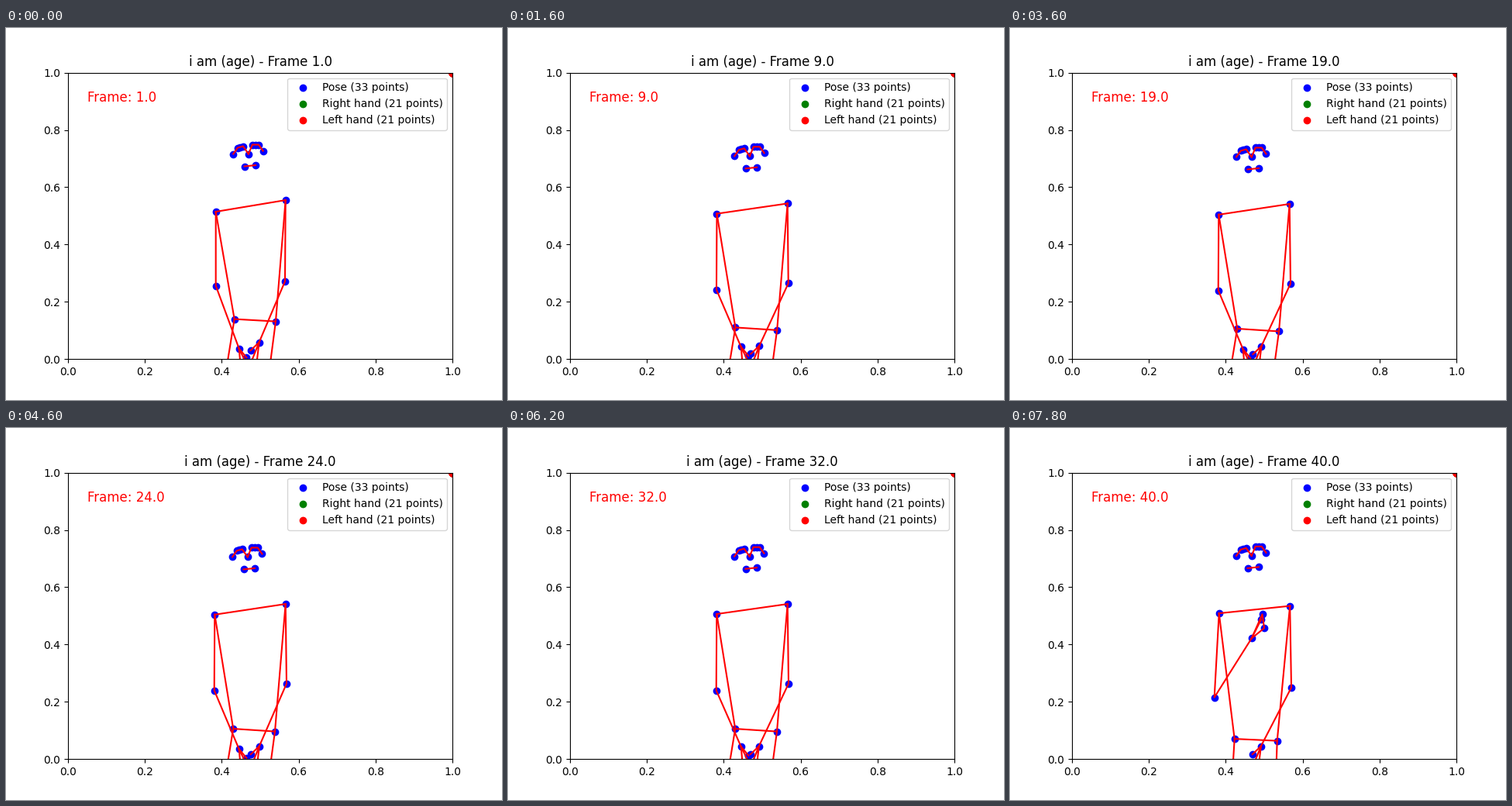
A matplotlib script for the animation above (8000 ms loop, 640 by 480 pixels).

```python
import numpy as np
import matplotlib.pyplot as plt
from matplotlib.animation import FuncAnimation

FRAMES = 40

# Resting pose in pixels, counted from the top left of the stage.
HEAD = {"nose": (312, 166), "ear_l": (330.7, 162), "ear_r": (292.4, 166),
        "mouth_l": (321.2, 180.5), "mouth_r": (306.8, 182)}
for k in range(3):
    HEAD[f"eye_l{k}"] = (317 + 4 * k, 154)
    HEAD[f"eye_r{k}"] = (305 - 3.5 * k, 156 + k)

# Resting place, offset at the start, offset once the hand is up.
BODY = {
    "shoulder_l": [(361, 227.5), (0, -5), (0.5, 2.5)],
    "shoulder_r": [(269.6, 240.3), (1.4, -2), (0.4, 0)],
    "elbow_l": [(362.3, 330.3), (-2, -3), (1, 5)],
    "hip_l": [(347.3, 392), (1, -13), (-2.3, 12)],
    "hip_r": [(293.5, 388.5), (1.5, -12.5), (-3.5, 13)],
    "knee_l": [(326, 550), (0, 0), (14, 0)],
    "knee_r": [(267, 550), (0, 0), (14, 0)],
    "wrist_l": [(325, 411), (0, -5), (0, 0)],
}

# Finger offsets from the left wrist.
FINGERS_L = {"pinky_l": (-3, 26), "index_l": (-10, 25), "thumb_l": (-11, 10.5)}
# Right fingers as (angle, length) from the wrist, lowered and raised.
FINGERS_R = {"pinky_r": [(85, 23), (-39, 21)], "index_r": [(64, 25), (-66, 34)],
             "thumb_r": [(50, 15), (-63, 27)]}

CHAINS = [
    "nose eye_l0 eye_l1 eye_l2 ear_l", "nose eye_r0 eye_r1 eye_r2 ear_r",
    "mouth_l mouth_r", "shoulder_l shoulder_r", "hip_l hip_r",
]
for s in "lr":
    CHAINS += [f"shoulder_{s} elbow_{s} wrist_{s} pinky_{s} index_{s} wrist_{s}",
               f"wrist_{s} thumb_{s}", f"shoulder_{s} hip_{s} knee_{s}"]


def pose(n):
    """Joint positions in axes units for counter value n."""
    settle = np.exp((1 - n) / 4)
    bob = np.sin(np.pi * (n - 9) / 24)
    sway = np.sin(2 * np.pi * (n - 19.5) / 22)
    rise = np.clip((n - 32) / 8, 0, 1)
    lean = 1 - (1 - rise) ** 2
    lift = rise ** 1.3

    pts = {}
    for name, place in HEAD.items():
        pts[name] = np.add(place, (1.2 * settle, 0.9 * bob - 2.3 * settle))
    for name, parts in BODY.items():
        rest, start, end = np.array(parts)
        pts[name] = rest + start * settle + end * lean
    pts["shoulder_r"][1] += bob
    pts["wrist_l"][0] += 2.2 * sway
    for name, offset in FINGERS_L.items():
        pts[name] = pts["wrist_l"] + offset

    # The right forearm swings up along an arc while the hand turns.
    pts["elbow_r"] = np.array([269 + 2 * settle - 5 * lift,
                               339 - 6 * settle + 9 * lift])
    pts["wrist_r"] = np.array([301 + 11 * lift + 11 * np.sin(np.pi * lift),
                               411 + 6.5 * settle + 4 * bob - 136 * lift])
    for name, (low, high) in FINGERS_R.items():
        angle, length = np.array(low) + np.subtract(high, low) * rise
        a = np.radians(angle)
        pts[name] = pts["wrist_r"] + length * np.array([np.cos(a), np.sin(a)])

    return {name: ((x - 80.3) / 496, (427.6 - y) / 369.6)
            for name, (x, y) in pts.items()}


fig, ax = plt.subplots(figsize=(6.4, 4.8), dpi=100)
ax.set_xlim(0, 1)
ax.set_ylim(0, 1)
title = ax.set_title("")
label = ax.text(0.05, 0.9, "", color="red", fontsize=12)
dots = ax.scatter([], [], color="blue", label="Pose (33 points)")
corner = np.ones(21)
ax.scatter(corner, corner, color="green", label="Right hand (21 points)")
ax.scatter(corner, corner, color="red", label="Left hand (21 points)")
bones = [ax.plot([], [], color="red", lw=1.5)[0] for _ in CHAINS]
ax.legend(loc="upper right")


def draw(i):
    n = i + 1
    pts = pose(n)
    dots.set_offsets(list(pts.values()))
    for bone, chain in zip(bones, CHAINS):
        bone.set_data(*zip(*(pts[name] for name in chain.split())))
    title.set_text(f"i am (age) - Frame {n:.1f}")
    label.set_text(f"Frame: {n:.1f}")
    return [dots, title, label, *bones]


anim = FuncAnimation(fig, draw, frames=FRAMES, interval=200, repeat=True,
                     repeat_delay=0)
plt.show()
```
